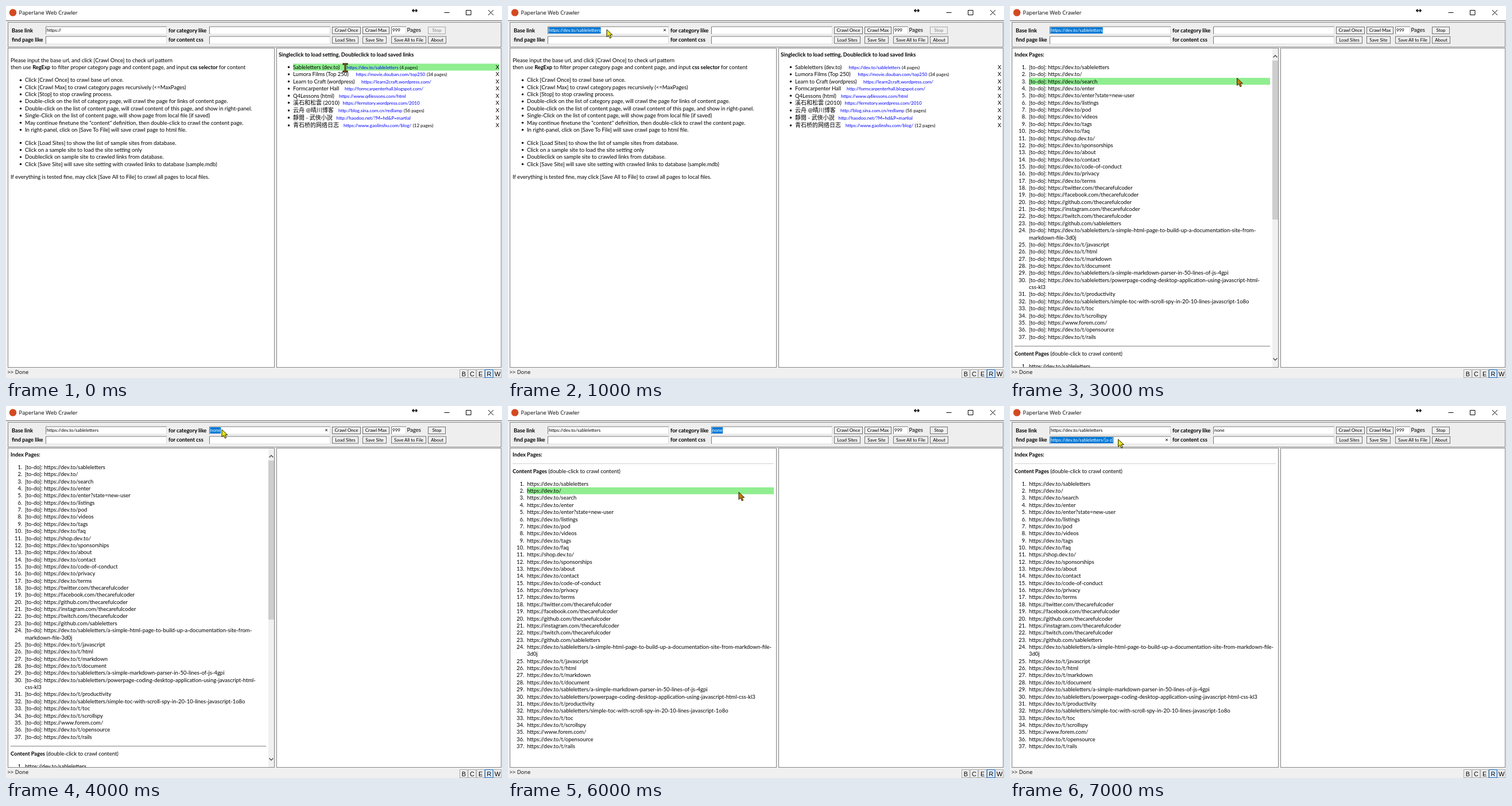
An HTML page for the animation above (8000 ms loop, 864 by 648 pixels).

```html
<!DOCTYPE html>
<html lang="en">
<head>
<meta charset="utf-8">
<title>Paperlane Web Crawler</title>
<style>
  html, body { margin: 0; width: 100%; height: 100%; overflow: hidden; background: #fff; }
  svg { display: block; width: 100vw; height: 100vh; }
  text { font: 9.5px Lato, "Noto Sans CJK SC", "Noto Sans CJK", sans-serif; word-spacing: -.1px; fill: #000; }
  .b { font-weight: 700; font-size: 9.3px; }
  .s { font-size: 8px; }
  .ui { font: 9.4px "Open Sans", sans-serif; word-spacing: 0; }
  .key { font: 11px "Liberation Sans", Arial, sans-serif; text-anchor: middle; }
  .cjk { font-size: 10px; }
  .mid { text-anchor: middle; }
  .end { text-anchor: end; }
  .link { fill: #00f; }
  .off { fill: #838383; }
  .sel { fill: #fff; }
</style>
</head>
<body>
<svg id="stage" viewBox="0 0 864 648" xmlns="http://www.w3.org/2000/svg"></svg>
<script>
const stage = document.getElementById('stage');
const LOOP = 8000, ROW = 12.36, GREEN = '#90ee90';
const USER = 'sableletters', BASE = 'https://dev.to/' + USER;

const rect = (x, y, w, h, fill, stroke) =>
  `<rect x="${x}" y="${y}" width="${w}" height="${h}" fill="${fill}"${stroke ? ` stroke="${stroke}"` : ''}/>`;
const text = (x, y, s, cls = '') => `<text x="${x}" y="${y}" class="${cls}">${s}</text>`;
const path = (d, stroke = '#000', width = 1, fill = 'none') =>
  `<path d="${d}" stroke="${stroke}" stroke-width="${width}" fill="${fill}"/>`;
const dot = (x, y) => `<circle cx="${x}" cy="${y}" r="1.7"/>`;
const cross = (x, y) => path(`M${x - 2} ${y - 2}l4 4m0 -4l-4 4`, '#222', 1);

function button(x, y, w, label, opt = {}) {
  return rect(x + .5, y + .5, w - 1, 12, opt.hot ? GREEN : '#efefef', opt.off ? '#a8a8a8' : '#707070') +
    text(x + w / 2, y + 9, label, 's mid' + (opt.off ? ' off' : ''));
}

// A field is {v: value, sel: selected, x: clear mark}
function field(x, y, w, f = {}) {
  let out = rect(x, y, w, 14, '#fff') +
    path(`M${x + .5} ${y + 13.5}V${y + .5}H${x + w}`, '#777') +
    path(`M${x + 1} ${y + 13.5}H${x + w - .5}V${y + 1}`, '#dcdcdc');
  if (f.sel) out += `<rect class="mark" x="${x + 1.5}" y="${y + 1.5}" width="0" height="11" fill="#0078d7"/>`;
  if (f.v) out += text(x + 2, y + 9.3, f.v, 's' + (f.sel ? ' sel' : ''));
  if (f.x) out += cross(x + w - 7, y + 6.5);
  return out;
}

function frame() {
  const keys = [...'BCERW'].map((c, i) => {
    const x = 790.5 + i * 14.7, on = c === 'R';
    return rect(x, 633.5, 13.4, 14, on ? '#e3effb' : '#f0f0f0', on ? '#0a64c8' : '#a8a8a8') +
      text(x + 6.8, 645, c, 'key');
  }).join('');
  return rect(0, 0, 864, 648, '#f0f0f0') + rect(0, 0, 864, 25, '#fff') +
    path('M0 25.5H864', '#666') +
    '<circle cx="12" cy="11.5" r="6.3" fill="#d24a20"/>' +
    text(22.5, 15.2, 'Paperlane Web Crawler', 'ui') +
    path('M708 8H716M710.3 5.5L707.8 8L710.3 10.5M713.7 5.5L716.2 8L713.7 10.5', '#000', 1.3) +
    path('M763.5 11.5H772.5M801.5 7.5H810V15.5H801.5ZM840 7L849 16M849 7L840 16') +
    rect(3.5, 28.5, 859, 43, '#eee', '#858585') +
    rect(3.5, 73.5, 464, 556, '#fff', '#858585') +
    rect(471.5, 73.5, 391, 556, '#fff', '#858585') +
    text(2.5, 641.3, '&gt;&gt; Done', 'ui') + keys;
}

function toolbar(s) {
  return text(10, 45.5, 'Base link', 'b') + field(69, 35.5, 211, s.base) +
    text(283, 45.5, 'for category like', 'b') + field(354, 35.5, 211, s.cat) +
    text(10, 62.3, 'find page like', 'b') + field(69, 52.5, 211, s.page) +
    text(283, 62.3, 'for content css', 'b') + field(354, 52.5, 211) +
    button(568, 36, 50, 'Crawl Once', {hot: s.hot}) + button(621, 36, 47, 'Crawl Max') +
    field(671, 35.5, 26, {v: '999'}) + text(698.5, 45.3, 'Pages') +
    button(735, 36, 31, 'Stop', {off: s.idle}) +
    button(568, 52.5, 46, 'Load Sites') + button(621, 52.5, 42, 'Save Site') +
    button(671, 52.5, 61, 'Save All to File') + button(735, 52.5, 32, 'About');
}

const HELP = [
  'Click [Crawl Once] to crawl base url once.',
  'Click [Crawl Max] to crawl category pages recursively (&lt;=MaxPages)',
  'Click [Stop] to stop crawling process.',
  'Double-click on the list of category page, will crawl the page for links of content page.',
  'Double-click on the list of content page, will crawl content of this page, and show in right-panel.',
  'Single-Click on the list of content page, will show page from local file (if saved)',
  'May continue finetune the "content" definition, then double-click to crawl the content page.',
  'In right-panel, click on [Save To File] will save crawl page to html file.'
];
const HELP2 = [
  'Click [Load Sites] to show the list of sample sites from database.',
  'Click on a sample site to load the site setting only',
  'Doubleclick on sample site to crawled links from database.',
  'Click [Save Site] will save site setting with crawled links to database (sample.mdb)'
];
const bullets = (list, y) => list.map((s, i) =>
  dot(25.5, y + i * ROW - 3.2) + text(33, y + i * ROW, s)).join('');

function help() {
  return text(8, 97.8, 'Please input the base url, and click [Crawl Once] to check url pattern') +
    text(8, 109.8, 'then use <tspan class="b">RegExp</tspan> to filter proper category page and content page, and input <tspan class="b">css selector</tspan> for content') +
    bullets(HELP, 132.4) + bullets(HELP2, 241.6) +
    text(8, 301.2, 'If everything is tested fine, may click [Save All to File] to crawl all pages to local files.');
}

// name, link, link x, row centre, page count
const SITES = [
  ['Sableletters (dev.to)', BASE, 593.5, 106.5, 4],
  ['Lumora Films (Top 250)', 'https://movie.douban.com/top250', 609.5, 119, 34],
  ['Learn to Craft (wordpress)', 'https://learn2craft.wordpress.com/', 619, 131.5],
  ['Formcarpenter Hall', 'http://formcarpenterhall.blogspot.com/', 590, 144],
  ['Q4Lessons (html)', 'https://www.q4lessons.com/html', 580, 156.3],
  ['溪石和松雲 (2010)', 'https://fernstory.wordpress.com/2010', 586.5, 168.5],
  ['云舟 @晴川博客', 'http://blog.sina.com.cn/redlamp', 579, 182, 56],
  ['靜閱 - 武俠小說', 'http://haodoo.net/?M=hd&amp;P=martial', 575.5, 194.5],
  ['青石桥的网络日志', 'https://www.gaolinshu.com/blog/', 588, 208, 12]
];

function sites(hover) {
  return text(475, 88, 'Singleclick to load setting, Doubleclick to load saved links', 'b') +
    SITES.map(([name, url, x, c, n], i) => {
      const y = c + 3.4;
      return (i === hover ? rect(500, c - 6, 359, 12, GREEN) : '') +
        dot(492.5, c) + text(500, y, name, i > 4 ? 'cjk' : '') +
        `<text x="${x}" y="${y}" class="s"><tspan class="link">${url}</tspan>` +
        (n ? `<tspan dx="2.5">(${n} pages)</tspan>` : '') + '</text>' +
        text(856, y, 'X', 'mid');
    }).join('');
}

const DEV = 'thecarefulcoder';
const PAGES = [
  USER, '', 'search', 'enter', 'enter?state=new-user', 'listings', 'pod', 'videos', 'tags', 'faq',
  'https://shop.dev.to/', 'sponsorships', 'about', 'contact', 'code-of-conduct', 'privacy', 'terms',
  ...['twitter', 'facebook', 'github', 'instagram', 'twitch'].map(h => `https://${h}.com/${DEV}`),
  'https://github.com/' + USER,
  USER + '/a-simple-html-page-to-build-up-a-documentation-site-from-~markdown-file-^3d0j',
  't/javascript', 't/html', 't/markdown', 't/document',
  USER + '/a-simple-markdown-parser-in-50-lines-of-js-4gpi',
  USER + '/powerpage-coding-desktop-application-using-javascript-html-~css-kl3',
  't/productivity', USER + '/simple-toc-with-scroll-spy-in-20-10-lines-javascript-1o8o',
  't/toc', 't/scrollspy', 'https://www.forem.com/', 't/opensource', 't/rails'
].map(p => p.startsWith('https') ? p : 'https://dev.to/' + p);

// "~" breaks a line in the narrow list, "^" in the wide one
function list(c, todo, hover) {
  let out = '', row = 0;
  const [cut, join] = todo ? ['~', '^'] : ['^', '~'];
  PAGES.forEach((p, i) => {
    const y = c + row * ROW;
    if (i === hover) out += rect(33, y - 6, todo ? 420 : 430, 12, GREEN);
    out += text(28.3, y + 3.4, i + 1 + '.', 'end');
    ((todo ? '[to-do]: ' : '') + p).replace(join, '').split(cut).forEach(line => {
      out += text(33, c + row++ * ROW + 3.4, line);
    });
  });
  return out;
}

const contentHead = c => text(8, c + 3.4, '<tspan class="b">Content Pages</tspan> (double-click to crawl content)');

function indexView(hover) {
  return text(8, 88, 'Index Pages:', 'b') + list(106.5, true, hover) +
    path('M8 592.5H453', '#808080') + contentHead(605.3) +
    '<svg x="4" y="74" width="453" height="555" viewBox="4 74 453 555" style="width:453px;height:555px">' +
    text(28.3, 631, '1.', 'end') + text(33, 631, BASE) + '</svg>' +
    rect(457, 74, 10, 555, '#f0f0f0') + rect(457, 95, 10, 277, '#cdcdcd') +
    path('M458.5 89.5L462 86L465.5 89.5M458.5 613.5L462 617L465.5 613.5', '#505050', 1.5);
}

function contentView(hover) {
  return text(8, 88, 'Index Pages:', 'b') + path('M8 100.5H463', '#d0d0d0') +
    contentHead(113.4) + list(135.3, false, hover);
}

const arrow = (x, y, fill) =>
  path(`M${x} ${y}v13l3.1 -2.8l2.4 5l2.3 -1.1l-2.3 -4.8h4.3z`, '#2a2400', 1, fill);
const YELLOW = '#e6e41c', LIME = '#d0e014', AMBER = '#c8780a';
const beam = (x, y) => path(`M${x - 4.5} ${y + 1}h9m-4.5 0v13m-4.5 0h9`, '#1c1800', 3) +
  path(`M${x - 3} ${y + 1}h6m-3 0v13m-3 0h6`, '#b87414', 1.1);

const picked = {v: BASE, sel: true}, plain = {v: BASE};
const none = {v: 'none', sel: true};
const STEPS = [
  {base: {v: 'https://'}, idle: true, body: () => help() + sites(0), cur: () => beam(591, 100)},
  {base: {...picked, x: true}, idle: true, body: () => help() + sites(), cur: () => arrow(172, 41, YELLOW)},
  {base: {...picked, x: true}, idle: true, hot: true, body: () => help() + sites(), cur: () => arrow(595.5, 45, LIME)},
  {base: picked, body: () => indexView(2), cur: () => arrow(395.5, 125.5, AMBER)},
  {base: plain, cat: {...none, x: true}, body: () => indexView(), cur: () => arrow(376, 41, YELLOW)},
  {base: plain, cat: {...none, x: true}, hot: true, body: () => indexView(), cur: () => arrow(607, 42, LIME)},
  {base: plain, cat: none, body: () => contentView(1), cur: () => arrow(402, 150, AMBER)},
  {base: plain, cat: {v: 'none'}, page: {v: BASE + '/[a-z]', sel: true, x: true},
    body: () => contentView(), cur: () => arrow(188.5, 58, YELLOW)}
];

let shown = -1;
function draw(t) {
  const k = Math.floor(t % LOOP / 1000);
  if (k !== shown) {
    shown = k;
    const s = STEPS[k];
    stage.innerHTML = frame() + toolbar(s) + s.body() + s.cur();
    // The selection is as wide as its text
    stage.querySelectorAll('.mark').forEach(m =>
      m.setAttribute('width', m.nextElementSibling.getComputedTextLength() + 1));
  }
}

const start = performance.now();
function tick() {
  draw(performance.now() - start);
  requestAnimationFrame(tick);
}
tick();
</script>
</body>
</html>
```
